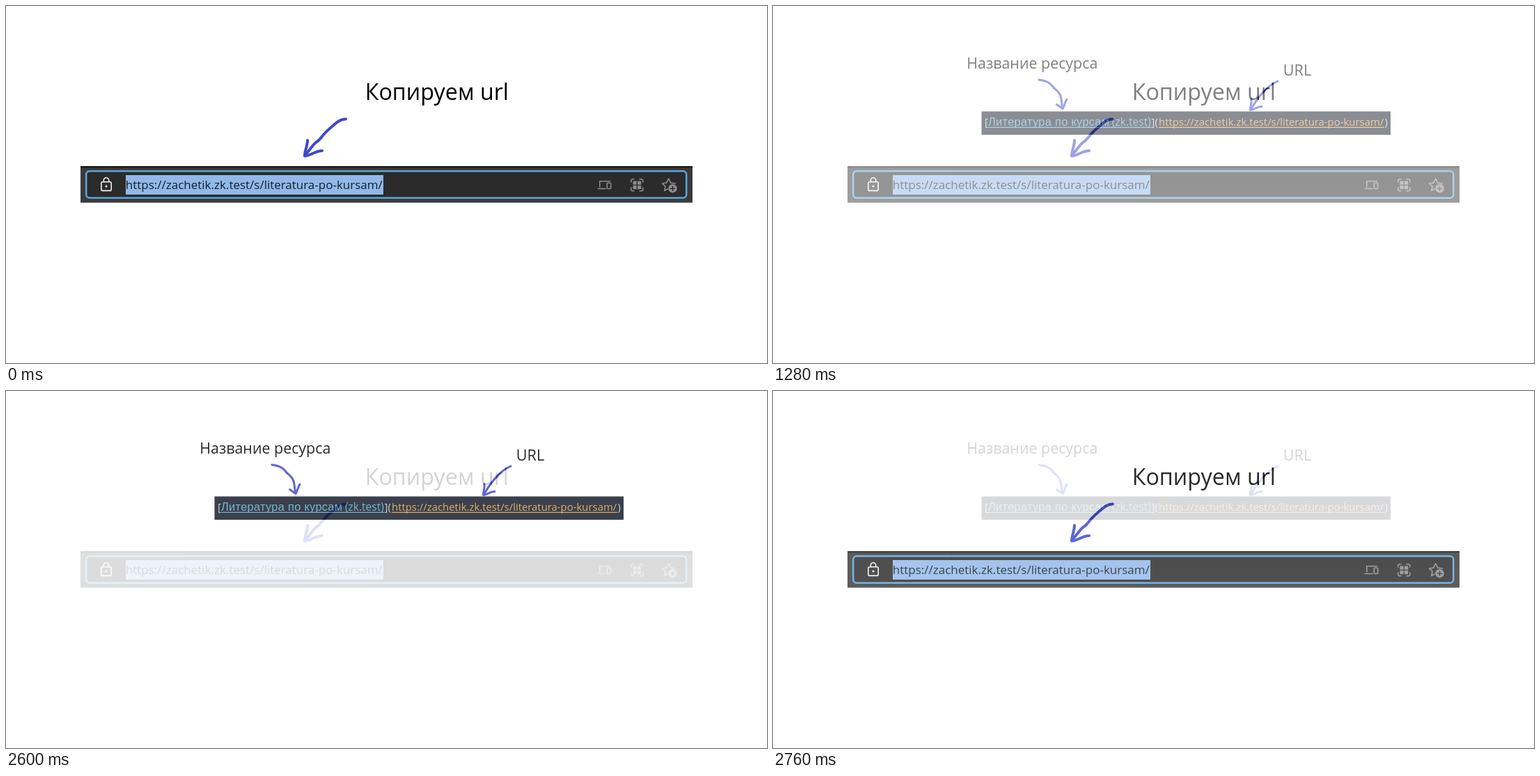
Write an HTML page that moves like this. It is 1093 px wide and 513 px high and loops after 2.8 s.

```html
<!DOCTYPE html>
<html lang="ru">
<head>
<meta charset="utf-8">
<title>Копируем url</title>
<style>
  html, body { margin: 0; width: 100%; height: 100%; overflow: hidden; background: #fff; }
  svg { position: absolute; left: 0; top: 0; width: 1093px; height: 513px; }
  text { font-family: "Open Sans", "Noto Sans", sans-serif; white-space: pre; }
  .pen { fill: none; stroke: #3f48cc; stroke-linecap: round; stroke-linejoin: round; }
  .icon { fill: none; stroke: #8c8c8c; stroke-width: 1.6; stroke-linecap: round; stroke-linejoin: round; }
  .solid { fill: #8c8c8c; stroke: none; }
  .cyr { font-family: "Liberation Sans", Arial, sans-serif; font-size: 16.4px; letter-spacing: .3px; }
  #link { opacity: 0; }
</style>
</head>
<body>
<svg id="copy" viewBox="0 0 1093 513">
  <rect width="1093" height="513" fill="#fff"/>
  <text x="515.7" y="135" font-size="32.2">Копируем url</text>
  <g class="pen" stroke-width="4">
    <path d="M488 162.500C480 162 473 169 465 176C459 181 455 186 451 191C448 195 445 195 442 199C438 204 434 209 430 214"/>
    <path d="M433 193C433 201 429 208 429 215.500C436 216 444 208 454 208"/>
  </g>

  <rect x="107" y="230" width="879" height="53" fill="#3b3b3b"/>
  <rect x="107" y="230" width="879" height="2.500" fill="#1c1c1c"/>
  <rect x="107" y="282" width="879" height="1" fill="#8a8684"/>
  <rect x="115.200" y="237.200" width="862" height="38.600" rx="5" fill="#2b2b2b" stroke="#5aa5dc" stroke-width="2.500"/>
  <rect x="172" y="243" width="370" height="28" fill="#90b9ea"/>
  <text class="url" x="171.8" y="263" font-size="17" fill="#1b1d22"></text>

  <g class="icon" style="stroke:#f2f2f2">
    <rect x="136.800" y="252.800" width="14.400" height="12.600" rx="2"/>
    <path d="M140.300 252.500V250.500a3.700 3.700 0 0 1 7.400 0V252.500"/>
    <circle cx="144" cy="259" r="1.500" fill="#f2f2f2" stroke="none"/>
  </g>
  <g class="icon">
    <path d="M850.500 262.500H861M852.800 260V251.800H867.500"/>
    <rect x="863.300" y="254.300" width="5.400" height="8.200" rx="1"/>
    <path d="M897.800 253V251.200a2.400 2.400 0 0 1 2.400-2.400H902M910 248.800H912.400a2.400 2.400 0 0 1 2.400 2.400V253M914.800 261V263.400a2.400 2.400 0 0 1-2.400 2.400H910M902 265.800H900.200a2.400 2.400 0 0 1-2.400-2.400V261"/>
    <path class="solid" d="M900.500 251.500h5.200v5.200h-5.200zM907 251.500h5.200v5.200h-5.200zM900.500 258h5.200v5.200h-5.200zM907 258h5.200v5.200h-5.200z"/>
    <path d="M950 263L945.800 265.500L947 259.200L942.500 255L948.700 254.100L951.700 248L954.700 254.100L961.500 255"/>
    <circle class="solid" cx="957.500" cy="262.200" r="6.200"/>
    <path d="M954.500 262.200h6M957.500 259.200v6" style="stroke:#2b2b2b"/>
  </g>
</svg>

<svg id="link" viewBox="0 0 1093 513">
  <rect width="1093" height="513" fill="#fff"/>
  <text x="278.3" y="89.500" font-size="21.4">Название ресурса</text>
  <text x="732.7" y="100" font-size="21.7">URL</text>
  <g class="pen" stroke-width="3">
    <path d="M382 106C391 107 398 110 402 116C405 120 409 121 412 127C415 133 414 141 416 147"/>
    <path d="M407.500 141.500L416 147.500C419 144 419 138 422 134"/>
    <path d="M725 108C716 112 711 116 706 122C698 129 692 139 686 149"/>
    <path d="M687 134C688 140 685 144 685.500 149.500C691 149 696 144 702 144.500"/>
  </g>

  <rect x="299.500" y="151.500" width="587.500" height="33.500" fill="#141a28"/>
  <g font-size="14.9" fill="#bcc5cf">
    <text x="304" y="172">[</text>
    <text x="543.5" y="172">](</text>
    <text x="878.5" y="172">)</text>
    <g fill="#5aa6cb">
      <text class="cyr" x="309" y="172">Литература по курсам</text>
      <text x="487" y="172" font-size="15.5">(zk.test)</text>
      <rect x="309" y="173.800" width="234.500" height="1.200"/>
    </g>
    <g fill="#dca04a">
      <text class="url" x="554" y="172"></text>
      <rect x="554" y="173.800" width="324" height="1.200"/>
    </g>
  </g>
</svg>

<script>
  const address = "https://zachetik.zk.test/s/literatura-po-kursam/";
  for (const el of document.querySelectorAll(".url")) el.textContent = address;

  // Stepped cross-fade: 40 ms per sixth, in both directions.
  const loop = 2800;
  const steps = [
    [0, 0, "steps(1, end)"],
    [1200, 0, "steps(6, start)"],
    [1440, 1, "steps(1, end)"],
    [2600, 1, "steps(5, start)"],
    [loop, 1 / 6, "linear"],
  ];
  document.getElementById("link").animate(
    steps.map(([ms, opacity, easing]) => ({ offset: ms / loop, opacity, easing })),
    { duration: loop, iterations: Infinity }
  );
</script>
</body>
</html>
```
